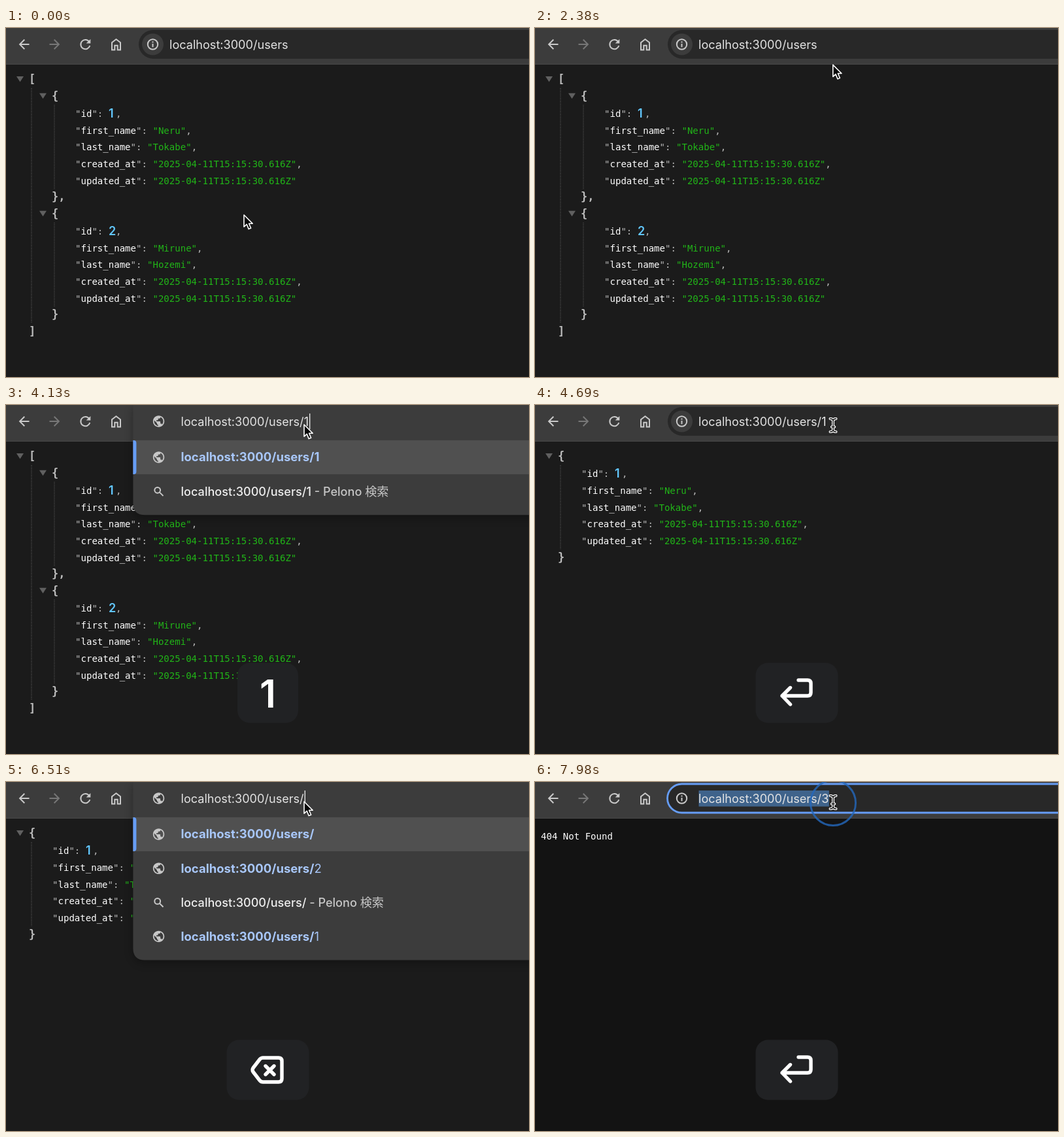
Animation of 800x534 px, one loop 8 s. Source, as an HTML page:

```html
<!DOCTYPE html>
<html lang="en">
<head>
<meta charset="utf-8">
<title>JSON user browser</title>
<style>
html, body { margin: 0; width: 100%; height: 100%; overflow: hidden; background: #1b1b1b; }
svg { display: block; width: 100vw; height: 100vh; }
text { white-space: pre; }
.mono { font: 14.05px "DejaVu Sans Mono", monospace; fill: #fff; }
.mono .p { fill: #b8b8b8; }
.mono .s { fill: #21b518; }
.num { font: 600 18px Inter, sans-serif; fill: #62c8ff; }
.brace { font: bold 17px "DejaVu Sans Mono", monospace; fill: #bdbdbd; }
.url { font: 18.1px Inter, "Noto Sans CJK JP", "Noto Sans CJK", sans-serif; fill: #e3e3e3; }
.row { font-size: 18.5px; }
.query { font-size: 18.1px; font-weight: 500; fill: #eee; }
.link { fill: #a8c7fa; }
.hint { fill: #c7c7c7; }
.b { font-weight: 700; }
.icon { fill: none; stroke: #c9c9c9; stroke-width: 2; }
.cap { font: 600 59px Inter, sans-serif; fill: #fff; text-anchor: middle; }
.glyph { fill: none; stroke: #fff; stroke-width: 5.4; stroke-linecap: round; stroke-linejoin: round; }
</style>
</head>
<body>
<svg viewBox="0 0 800 534" preserveAspectRatio="none">
  <defs>
    <path id="globe" transform="translate(-10.4 -10.4) scale(.87)" fill="#c7c7c7" d="M12 2C6.48 2 2 6.48 2 12s4.48 10 10 10 10-4.48 10-10S17.52 2 12 2zm-1 17.93c-3.95-.49-7-3.85-7-7.93 0-.62.08-1.21.21-1.79L9 15v1c0 1.1.9 2 2 2v1.93zm6.9-2.54c-.26-.81-1-1.39-1.9-1.39h-1v-3c0-.55-.45-1-1-1H8v-2h2c.55 0 1-.45 1-1V7h2c1.1 0 2-.9 2-2v-.41c2.93 1.19 5 4.06 5 7.41 0 2.08-.8 3.97-2.1 5.39z"/>
    <g id="lens" class="icon"><circle cx="-1.8" cy="-1.8" r="4.4"/><path d="M1.5 1.5L7 7"/></g>
    <path id="stem" d="M-4.5-10Q0-10 0-6.5Q0-10 4.5-10M0-6.5V6.5M-4.5 10Q0 10 0 6.5Q0 10 4.5 10M-2.2 2.5H2.2"/>
    <filter id="soft" x="-10%" y="-10%" width="120%" height="130%"><feGaussianBlur stdDeviation="7"/></filter>
  </defs>
  <g id="page"></g>
  <rect width="800" height="55" fill="#3c3c3c"/>
  <rect y="55" width="800" height="1" fill="#484848"/>
  <g class="icon">
    <path d="M35.5 25H21.5M28.3 17.8L21.1 25l7.2 7.2"/>
    <path d="M66.5 25h14M73.7 17.8l7.2 7.2l-7.2 7.2" stroke="#777"/>
    <path d="M127.3 21.2A7.1 7.1 0 1 0 128.3 27"/>
    <path d="M129.3 17v6.6h-6.6z" fill="#c9c9c9" stroke="none"/>
    <path d="M162 33.5V22.3l6.5-5l6.5 5V33.5h-4.3v-6.8h-4.4v6.8z"/>
  </g>
  <g id="bar"></g>
  <g id="key"></g>
  <circle id="ring" cx="456" cy="32" fill="none" stroke="#2468bd" stroke-width="3"/>
  <g id="mouse">
    <path id="arrow" d="M0 0V18.2L4.2 14.3L7.2 21.6L10.6 20.2L7.6 13.2H13.2Z" fill="#080808" stroke="#fff" stroke-width="1.6" stroke-linejoin="round"/>
    <g id="beam" fill="none" stroke-linecap="round">
      <use href="#stem" stroke="#fff" stroke-width="4"/>
      <use href="#stem" stroke="#111" stroke-width="1.4"/>
    </g>
  </g>
</svg>
<script>
const LOOP = 8000, BASE = 'localhost:3000/users', STAMP = '2025-04-11T15:15:30.616Z';
const users = [['Neru', 'Tokabe'], ['Mirune', 'Hozemi']];
const el = id => document.getElementById(id);
const text = (x, y, s, cls) => `<text x="${x}" y="${y}" class="${cls}">${s}</text>`;
const span = (cls, s) => `<tspan class="${cls}">${s}</tspan>`;
const rowY = i => 79 + 25.72 * i;

function put(id, html) {
  const node = el(id);
  if (node.last !== html) node.innerHTML = node.last = html;
}

// Value in force at time t from [start, value] steps.
function at(steps, t) {
  let v = steps[0][1];
  for (const [start, value] of steps) if (t >= start) v = value;
  return v;
}

const brace = (col, row, s) => text(35 + 35 * col, rowY(row) + 5.4, s, 'brace');
const toggle = (col, row) =>
  `<path d="M${16 + 35 * col} ${rowY(row) - 5}h11l-5.5 8.6z" fill="#606060"/>`;
const guide = (col, from, to) =>
  `<path d="M${39 + 35 * col} ${rowY(from) + 13}V${rowY(to) - 13}" stroke="#686868" stroke-dasharray="1 1.5"/>`;

function record(id, col, row, end = '') {
  const [first, last] = users[id - 1];
  const x = 71 + 35 * col, base = i => rowY(row + i) + 5.4;
  const name = k => span('p', '"') + k + span('p', '": ');
  const fields = [['first_name', first], ['last_name', last], ['created_at', STAMP], ['updated_at', STAMP]];
  return toggle(col, row) + brace(col, row, '{') + guide(col, row, row + 6) +
    text(x, base(1), name('id'), 'mono') + text(x + 51, base(1) + .8, id, 'num') +
    text(x + 62, base(1), span('p', ','), 'mono') +
    fields.map(([k, v], i) => text(x, base(i + 2),
      name(k) + span('s', `"${v}"`) + span('p', i < 3 ? ',' : ''), 'mono')).join('') +
    brace(col, row + 6, '}' + end);
}

const backdrop = c => `<rect width="800" height="534" fill="${c}"/>`;
const pages = {
  list: backdrop('#1b1b1b') + toggle(0, 0) + brace(0, 0, '[') + guide(0, 0, 15) +
    record(1, 1, 1, ',') + record(2, 1, 8) + brace(0, 15, ']'),
  one: backdrop('#1b1b1b') + record(1, 0, 0),
  missing: backdrop('#131313') + text(9, 88, '404 Not Found', 'mono')
};

// Address bar modes: idle, selected, caret, open.
const modes = [[0, 'idle'], [2660, 'selected'], [3640, 'caret'], [3850, 'open'], [4480, 'idle'],
  [5320, 'selected'], [6300, 'caret'], [6440, 'open'], [6930, 'idle'], [7840, 'selected']];
const tails = [[0, ''], [3850, '/'], [4060, '/1'], [6440, '/'], [6650, '/3']];
const docs = [[0, 'list'], [4550, 'one'], [7350, 'missing']];
const clicks = [2660, 5280, 7840];
const keys = [[3640, 'right'], [3850, '/'], [4060, '1'], [4340, 'enter'],
  [6300, 'right'], [6440, 'back'], [6650, '3'], [6860, 'enter']];
const glyphs = {
  enter: 'M403 421H417Q422 421 422 426V440Q422 445 417 445H378M390.5 432.5L378 445L390.5 458',
  back: 'M393 422H417Q422 422 422 427V454Q422 459 417 459H393Q390 459 388 456.5L378 443.5Q376 440.5 378 437.5L388 424.5Q390 422 393 422ZM397 434.5L410 447.5M410 434.5L397 447.5',
  right: 'M377 441H422M408 427L422 441L408 455'
};

const ruler = document.createElementNS('http://www.w3.org/2000/svg', 'text');
ruler.setAttribute('class', 'url');
ruler.setAttribute('visibility', 'hidden');
document.querySelector('svg').append(ruler);
function widthOf(s) {
  ruler.textContent = s;
  return ruler.getComputedTextLength();
}

const globe = y => `<use href="#globe" transform="translate(233.5 ${y})"/>`;
const lens = y => `<use href="#lens" transform="translate(233.5 ${y})"/>`;
const caret = x => `<rect x="${x}" y="13" width="1.3" height="24" fill="#eee"/>`;

function dropdown(tail) {
  const url = BASE + tail;
  const site = rest => [globe, span('link b', url) + span('link', rest), 'row'];
  const search = [lens, url + span('hint', ' - Pelono 検索'), 'query'];
  const rows = tail === '/' ? [site(''), site('2'), search, site('1')] : [site(''), search];
  const h = 64 + 52.1 * rows.length;
  const shape = `M194.4 0H810V${h}H212.4Q194.4 ${h} 194.4 ${h - 18}Z`;
  return `<path d="${shape}" filter="url(#soft)" transform="translate(0 4)" opacity=".3"/>` +
    `<path d="${shape}" fill="#3c3c3c"/><rect x="194.4" y="54" width="606" height="52" fill="#505050"/>` +
    `<path d="M194.4 54h1q4 0 4 4v44q0 4-4 4h-1z" fill="#669df6"/>` +
    globe(25) + text(267.5, 31.5, url, 'url') + caret(268.5 + widthOf(url)) +
    rows.map(([icon, s, cls], i) =>
      icon(80 + 52.1 * i) + text(267.5, 86.4 + 52.1 * i, s, 'url ' + cls)).join('');
}

function addressBar(mode, tail) {
  if (mode === 'open') return dropdown(tail);
  const url = BASE + tail, w = widthOf(url);
  const pill = mode !== 'idle'
    ? '<rect x="202.5" y="3" width="640" height="44" rx="22" fill="#282828" stroke="#669df6" stroke-width="2.8"/>'
    : '<rect x="203" y="3" width="640" height="44" rx="22" fill="#282828"/><circle cx="224.5" cy="25" r="16.5" fill="#3c3c3c"/>';
  return pill +
    '<g class="icon"><circle cx="224.5" cy="25" r="7.7"/><path d="M224.5 24V29.2M224.5 20.6V22.5"/></g>' +
    (mode === 'selected' ? `<rect x="250.5" y="13" width="${w}" height="24.5" fill="#3f638b"/>` : '') +
    text(250, 31.5, url, 'url') + (mode === 'caret' ? caret(251 + w) : '');
}

function keyCap(t) {
  const [start, name] = keys.filter(k => t >= k[0]).pop() || [];
  if (!name || t > start + 1610) return '';
  const alpha = Math.min(1, (start + 1610 - t) / 250);
  const w = glyphs[name] ? 126 : 93;
  return `<g opacity="${alpha.toFixed(2)}"><rect x="${400.5 - w / 2}" y="394.5" width="${w}" height="92" rx="19" fill="#212224"/>` +
    (glyphs[name] ? `<path class="glyph" d="${glyphs[name]}"/>` : text(400.5, 462.5, name, 'cap')) + '</g>';
}

const track = [[0, 364, 286], [700, 364, 286], [980, 488, 142], [1190, 455, 130], [2100, 455, 130], [2520, 456, 31]];
function mouseAt(t) {
  const i = track.findLastIndex(p => t >= p[0]);
  const a = track[i], b = track[i + 1] || a;
  const u = b === a ? 0 : (t - a[0]) / (b[0] - a[0]), e = u * u * (3 - 2 * u);
  return [a[1] + (b[1] - a[1]) * e, a[2] + (b[2] - a[2]) * e];
}

function drawRing(t) {
  const age = t - (clicks.filter(c => t >= c).pop() ?? -LOOP);
  const grow = Math.min(1, age / 120);
  el('ring').setAttribute('r', 24 + 10.5 * grow);
  el('ring').setAttribute('opacity', Math.max(0, Math.min(.8, (360 - age) / 200)));
}

function render(t) {
  const mode = at(modes, t);
  put('page', pages[at(docs, t)]);
  put('bar', addressBar(mode, at(tails, t)));
  put('key', keyCap(t));
  drawRing(t);
  const [x, y] = mouseAt(t), beam = y < 50 && mode !== 'open';
  el('mouse').setAttribute('transform', `translate(${x} ${mode === 'open' ? y - 1 : y})`);
  el('arrow').style.display = beam ? 'none' : '';
  el('beam').style.display = beam ? '' : 'none';
}

const begin = performance.now();
function tick() {
  render((performance.now() - begin) % LOOP);
  requestAnimationFrame(tick);
}
tick();
</script>
</body>
</html>
```
